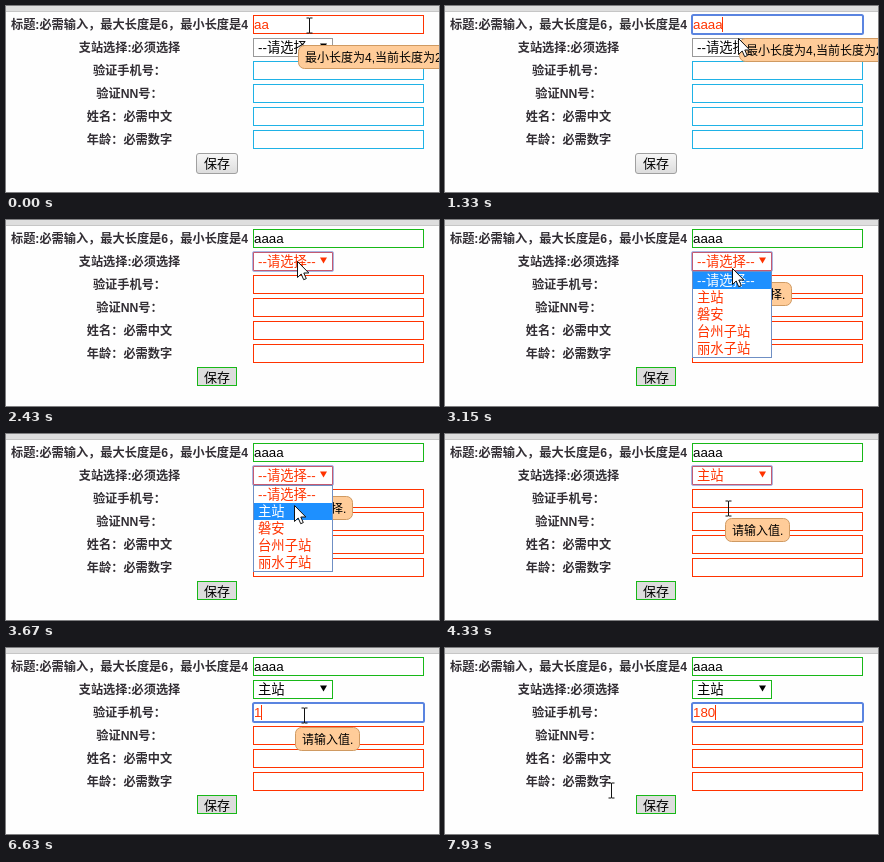
Write an HTML page that moves like this. It is 433 by 186 pixels and loops after 8000 ms.

```html
<!DOCTYPE html>
<html lang="zh">
<head>
<meta charset="utf-8">
<title>表单验证</title>
<style>
html, body { margin: 0; width: 100%; height: 100%; overflow: hidden; background: #fefefe; }
svg { display: block; width: 433px; height: 186px; }
text { font: 13.33px "Liberation Sans", "Noto Sans CJK SC", "Noto Sans CJK", sans-serif; fill: #000; white-space: pre; }
.label { font-size: 12.2px; font-weight: bold; text-anchor: middle; fill: #332f35; }
.button { font-size: 13px; }
.tip text { font-size: 12px; }
.tip rect { fill: #ffcc99; stroke: #cf9a62; }
.box { fill: #fff; stroke: #777; }
.ring { fill: none; stroke: #5a84e0; stroke-width: 2; }
.bad { fill: #ff3300; }
</style>
</head>
<body>
<svg viewBox="0 0 433 186">
  <defs>
    <linearGradient id="face" x2="0" y2="1">
      <stop stop-color="#f7f7f7"/><stop offset="1" stop-color="#dcdcdc"/>
    </linearGradient>
  </defs>
  <rect width="433" height="5" fill="#dedede"/>
  <rect y="5" width="433" height="1" fill="#c6c6c6"/>
  <g id="form"></g>

  <g id="select">
    <rect id="selectBox" class="box" x="247.5" y="32.5" width="79" height="18"/>
    <rect id="selectRing" x="246.5" y="31.5" width="81" height="20" rx="1.5" fill="none" stroke="#a9b6e2"/>
    <text id="selectText" x="252" y="46"></text>
    <path id="selectArrow" d="M314 37.5h7l-3.5 6z"/>
  </g>

  <rect id="plainButton" x="190.5" y="147.5" width="41" height="20" rx="2.5" fill="url(#face)" stroke="#a0a0a0"/>
  <rect id="markedButton" x="191.5" y="147.5" width="39" height="18" fill="#dddddd" stroke="#18b818"/>
  <text class="button" x="198" y="161.5">保存</text>

  <rect id="ring" class="ring" x="247" width="171" height="19" rx="1.5"/>
  <text id="titleText" x="248" y="23"></text>
  <text id="phoneText" class="bad" x="248" y="69"></text>
  <rect id="caret" class="bad" width="1" height="15"/>

  <g id="tip" class="tip">
    <rect height="23" rx="6"/>
    <text x="6.5" y="16.5"></text>
  </g>

  <g id="list">
    <rect x="247.5" y="51.5" width="79" height="86" fill="#fff" stroke="#6f8fc4"/>
    <rect id="mark" x="248" width="78" height="17" fill="#1e90ff"/>
  </g>

  <path id="arrow" d="M.5.5v16l3.7-3.5 2.5 5.7 2.6-1.1-2.5-5.6h5z" fill="#fff" stroke="#111"/>
  <path id="beam" d="M-3-7.5h2.5q.5 0 .5.5v14q0 .5-.5.5h-2.5M3-7.5h-2.5q-.5 0-.5.5v14q0 .5.5.5h2.5" fill="none" stroke="#111"/>
</svg>

<script>
const LOOP = 8000, PITCH = 23, RED = '#ff3300', GREEN = '#18b818', CYAN = '#1fb2e6';
const $ = id => document.getElementById(id);

function add(parent, tag, attrs, text = '') {
  const el = document.createElementNS('http://www.w3.org/2000/svg', tag);
  for (const key in attrs) el.setAttribute(key, attrs[key]);
  el.textContent = text;
  return parent.appendChild(el);
}
const show = (id, on) => { $(id).style.display = on ? '' : 'none'; };
const place = (id, x, y) => $(id).setAttribute('transform', `translate(${x} ${y})`);

const labels = ['标题:必需输入，最大长度是6，最小长度是4', '支站选择:必须选择', '验证手机号：',
                '验证NN号：', '姓名：必需中文', '年龄：必需数字'];
const fields = [];
labels.forEach((label, i) => {
  const y = 9 + PITCH * i;
  add($('form'), 'text', { class: 'label', x: 123.5, y: y + 13.5 }, label);
  if (i !== 1) fields[i] = add($('form'), 'rect', { class: 'box', x: 247.5, y: y + .5, width: 170, height: 18 });
});

const options = ['--请选择--', '主站', '磐安', '台州子站', '丽水子站'].map((name, i) =>
  add($('list'), 'text', { x: 252, y: 65 + 17 * i }, name));

const TOO_SHORT = '最小长度为4,当前长度为2', PICK = '必须选择.', ENTER = '请输入值.';

// Each step lists only what changes at that time (ms).
const steps = [
  [0, { title: 'aa', phone: '', focus: '', caret: true, checked: false, passed: false, choice: 0,
        list: -1, tip: [292.5, 39.5, TOO_SHORT], cursor: ['beam', 303.5, 19.5] }],
  [750, { focus: 'title', tip: [294.5, 32.5, TOO_SHORT], cursor: ['beam', 296.5, 19.5] }],
  [1050, { title: 'aaa' }],
  [1330, { title: 'aaaa', cursor: ['arrow', 293, 32] }],
  [1450, { tip: null, cursor: ['beam', 272.5, 83.5] }],
  [1600, { cursor: ['arrow', 229, 132] }],
  [1750, { cursor: ['arrow', 213, 151] }],
  [1880, { cursor: ['arrow', 211, 154] }],
  [2000, { focus: '', checked: true }],
  [2150, { focus: 'select', cursor: ['arrow', 239, 118] }],
  [2270, { cursor: ['arrow', 282, 53] }],
  [2430, { cursor: ['arrow', 291, 41] }],
  [2580, { cursor: ['arrow', 289, 50] }],
  [2730, { tip: [282.5, 62.5, PICK], cursor: ['arrow', 287, 48] }],
  [3150, { list: 0 }],
  [3400, { cursor: ['arrow', 288, 53] }],
  [3550, { list: 1, cursor: ['arrow', 289, 69] }],
  [3670, { cursor: ['arrow', 288, 71] }],
  [3810, { list: -1, choice: 1, tip: null }],
  [3930, { cursor: ['beam', 289.5, 71.5] }],
  [4210, { cursor: ['beam', 283.5, 74.5] }],
  [4330, { tip: [280.5, 84.5, ENTER] }],
  [4700, { tip: null, cursor: ['arrow', 278, 98] }],
  [4820, { cursor: ['arrow', 243, 139] }],
  [4960, { cursor: ['arrow', 213, 152] }],
  [5090, { focus: '', passed: true }],
  [5240, { focus: 'phone', cursor: ['beam', 282.5, 90.5] }],
  [5390, { cursor: ['beam', 284.5, 80.5] }],
  [5510, { cursor: ['beam', 292.5, 72.5] }],
  [5660, { tip: [289.5, 79.5, ENTER] }],
  [6190, { cursor: ['beam', 298.5, 67.5] }],
  [6630, { phone: '1' }],
  [6940, { phone: '18' }],
  [7090, { phone: '180' }],
  [7520, { caret: false }],
  [7930, { caret: true, tip: null, cursor: ['beam', 166.5, 142.5] }],
];

function drawFields(s) {
  fields.forEach((field, i) => {
    const isTitle = i === 0;
    field.style.stroke = s.checked ? (isTitle ? GREEN : RED) : (isTitle ? RED : CYAN);
  });
  $('titleText').textContent = s.title;
  $('titleText').style.fill = s.checked ? '#000' : RED;
  $('phoneText').textContent = s.phone;

  const typing = s.focus === 'title' || s.focus === 'phone';
  show('ring', typing);
  show('caret', typing && s.caret);
  if (!typing) return;
  const top = s.focus === 'title' ? 9 : 55;
  const text = $(s.focus + 'Text');
  $('ring').setAttribute('y', top);
  $('caret').setAttribute('y', top + 2);
  $('caret').setAttribute('x', 248 + Math.floor(text.textContent ? text.getComputedTextLength() : 0));
}

function drawSelect(s) {
  const ink = s.checked && !s.passed ? RED : '#000';
  $('selectBox').style.stroke = s.passed ? GREEN : s.checked ? '#c45a72' : '#999';
  $('selectText').textContent = options[s.choice].textContent;
  $('selectText').style.fill = $('selectArrow').style.fill = ink;
  show('selectRing', s.focus === 'select');
  show('list', s.list >= 0);
  $('mark').setAttribute('y', 52 + 17 * Math.max(s.list, 0));
  options.forEach((option, i) => { option.style.fill = i === s.list ? '#fff' : RED; });
}

function drawTip(tip) {
  show('tip', tip);
  if (!tip) return;
  const [x, y, message] = tip, [box, text] = $('tip').children;
  text.textContent = message;
  box.setAttribute('width', Math.round(text.getComputedTextLength() + 13));
  place('tip', x, y);
}

function draw(time) {
  const s = Object.assign({}, ...steps.filter(([at]) => at <= time).map(step => step[1]));
  drawFields(s);
  drawSelect(s);
  drawTip(s.tip);
  show('plainButton', !s.checked);
  show('markedButton', s.checked);
  const [kind, x, y] = s.cursor;
  show('arrow', kind === 'arrow');
  show('beam', kind === 'beam');
  place(kind, x, y);
}

const start = performance.now();
function tick() {
  draw((performance.now() - start) % LOOP);
  requestAnimationFrame(tick);
}
tick();
</script>
</body>
</html>
```
